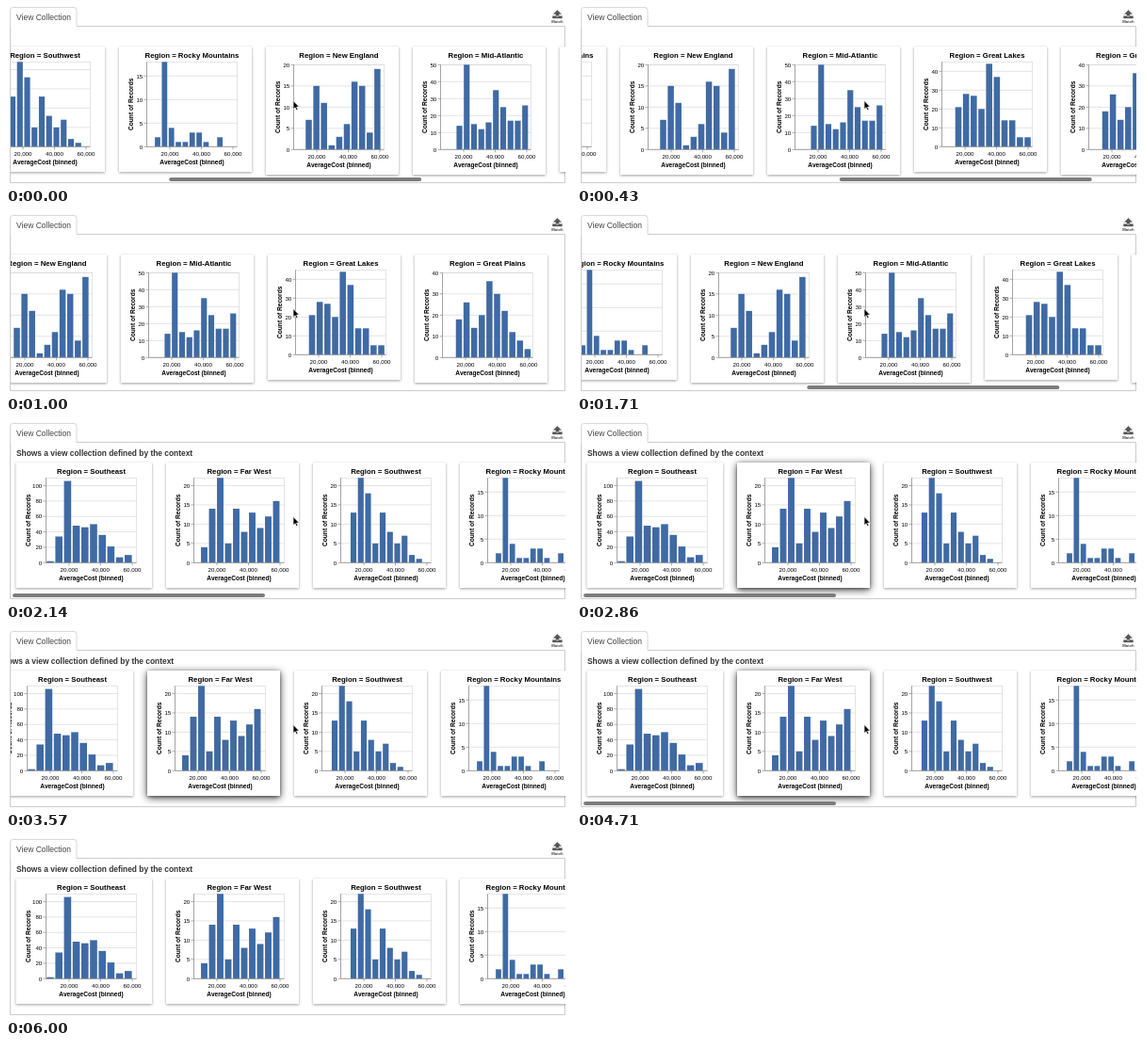
An HTML page that plays this animation: 600x191 px, repeating every 6570 ms.

```html
<!DOCTYPE html>
<html lang="en">
<head>
<meta charset="utf-8">
<title>View Collection</title>
<style>
  html, body { margin: 0; width: 100%; height: 100%; overflow: hidden; background: #fff; }
  svg { display: block; width: 600px; height: 191px; font-family: "Liberation Sans", Arial, sans-serif; }
  .card { fill: #fff; filter: drop-shadow(0 1px 1.5px rgba(0, 0, 0, .38)); }
  .lift { fill: #fff; filter: drop-shadow(0 2px 4.5px rgba(0, 0, 0, .75)); }
  .bar { fill: #3f6aa4; }
  .grid { fill: none; stroke: #d9d9d9; stroke-width: .7; }
  .axis { fill: none; stroke: #888; stroke-width: .7; }
  .title { font-weight: bold; font-size: 7.8px; text-anchor: middle; }
  .name { font-weight: bold; font-size: 6.6px; text-anchor: middle; }
  .tick { font-size: 6.2px; text-anchor: middle; }
  .end { text-anchor: end; }
</style>
</head>
<body>
<svg viewBox="0 0 600 191">
  <defs><clipPath id="panel"><rect x="5" y="22" width="589" height="165"/></clipPath></defs>
  <g fill="none" stroke="#ccc">
    <path d="M4.5 21.5V187.5H593.5V21.5H75"/>
    <path d="M4.5 21.5V4.5Q4.5 1.5 7.5 1.5H72Q75 1.5 75 4.5V21.5" stroke="#d6d6d6"/>
  </g>
  <text x="11" y="15" font-size="8.5" fill="#444">View Collection</text>
  <path d="M585.5 4.5L589.5 8.5H587V11.5H584V8.5H581.5ZM580.5 10.5V13H590.5V10.5" fill="#555" stroke="#555" stroke-width=".4"/>
  <text x="585.5" y="17.5" font-size="4.3" font-weight="bold" fill="#444" text-anchor="middle">Match</text>
  <g clip-path="url(#panel)">
    <g id="content">
      <text x="11" y="36" font-size="8.4" font-weight="bold" fill="#333">Shows a view collection defined by the context</text>
    </g>
    <rect id="thumb" y="182" width="268" height="4" rx="2" fill="#7c7c7c"/>
  </g>
  <path id="cursor" d="M0 0V9L2.1 7.2L3.5 10.3L5 9.6L3.6 6.6H6.4Z" stroke="#fff" stroke-width=".7"/>
</svg>
<script>
const LOOP = 6570, STEP = 1000 / 7;
const $ = id => document.getElementById(id);

function add(parent, tag, attrs, text = '') {
  const el = document.createElementNS('http://www.w3.org/2000/svg', tag);
  for (const key in attrs) el.setAttribute(key, attrs[key]);
  el.textContent = text;
  return parent.appendChild(el);
}

// region, y maximum, y tick step, first bar centre, bar pitch, counts
const charts = [
  ['Southeast', 110, 20, 36.5, 9.2, [2, 34, 106, 48, 46, 50, 36, 21, 7, 10]],
  ['Far West', 22, 5, 40.5, 8.5, [4, 14, 22, 5, 14, 8, 13, 9, 12, 16]],
  ['Southwest', 22, 5, 43, 7.75, [13, 22, 18, 5, 13, 8, 5, 7, 2, 1]],
  ['Rocky Mountains', 18, 5, 41, 7.35, [2, 18, 4, 1, 1, 3, 3, 1, 0, 2]],
  ['New England', 20, 5, 45.5, 8.1, [7, 15, 11, 1, 3, 6, 16, 15, 4, 19]],
  ['Mid-Atlantic', 50, 10, 49.5, 7.75, [14, 50, 15, 12, 16, 35, 25, 17, 17, 26]],
  ['Great Lakes', 45, 10, 47, 8.17, [21, 28, 27, 20, 44, 37, 14, 14, 5, 5]],
  ['Great Plains', 40, 10, 47, 8.1, [18, 26, 14, 20, 36, 30, 22, 12, 8, 4]]
];

function drawCard([region, max, step, first, pitch, counts], i) {
  const wide = i === 0;
  const drop = max % step ? 0 : 3;      // a label at the very top pushes the plot down
  const left = wide ? 32 : 29.5, base = 106.3 + drop, height = 90, width = 96;
  const y = value => base - value / max * height;
  const g = add($('content'), 'g', { transform: `translate(${wide ? 10.5 : 14 + 156 * i} 43)` });
  const box = { width: wide ? 144.5 : 141, height: 133 + drop };
  add(g, 'rect', { ...box, class: 'card' });
  const lift = add(g, 'rect', { ...box, class: 'lift', opacity: 0 });

  add(g, 'text', { x: left + width / 2, y: 12, class: 'title' }, 'Region = ' + region);
  add(g, 'rect', { x: left, y: base - height, width, height, class: 'grid' });
  for (let v = 0; v <= max; v += step) {
    add(g, 'path', { d: `M${left} ${y(v)}h${width}`, class: 'grid' });
    add(g, 'path', { d: `M${left} ${y(v)}h-3`, class: 'axis' });
    add(g, 'text', { x: left - 4.2, y: y(v) + 2.2, class: 'tick end' }, v);
  }
  counts.forEach((n, k) => add(g, 'rect', {
    x: first + k * pitch - (pitch - 1.6) / 2, y: y(n), width: pitch - 1.6, height: base - y(n), class: 'bar'
  }));
  add(g, 'path', { d: `M${left} ${base - height}V${base}h${width}`, class: 'axis' });
  [20, 40, 60].forEach((n, k) => {
    const x = left + 24.5 + 33.5 * k;
    add(g, 'path', { d: `M${x} ${base}v3`, class: 'axis' });
    add(g, 'text', { x, y: base + 9.4, class: 'tick' }, n + ',000');
  });
  add(g, 'text', { x: left + width / 2, y: base + 18.7, class: 'name' }, 'AverageCost (binned)');
  add(g, 'text', {
    transform: `translate(${wide ? 15.5 : 14.5} ${base - height / 2}) rotate(-90)`, class: 'name'
  }, 'Count of Records');
  return lift;
}

const lifts = charts.map(drawCard);

// Tracks are [step, value] pairs, joined by straight lines
const scroll = [[0, 362], [3, 592], [4, 640], [5, 664], [6, 672], [9, 672], [10, 652], [11, 592], [12, 517],
  [13, 310], [14, 110], [15, 0], [16, 35], [17, 94], [18, 60], [19, 15], [20, 0], [24, 0], [25, 20], [26, 0],
  [31, 0], [32, 9], [33, 0]];
const thumbAlpha = [[0, 1], [5, 1], [7, 0], [10, 0], [11, 1], [20, 1], [23, 0], [25, 0], [26, 1], [27, 1],
  [30, 0], [32, 0], [33, 1], [34, 1], [37, 0]];
const farWestLift = [[15, 0], [16, 1], [38, 1], [41, 0]];
const southwestLift = [[38, 0], [40, .7], [42, 0]];
const cursorX = [[38, 305], [39, 322], [40, 360], [41, 410]];
const cursorY = [[38, 100.5], [39, 116], [40, 140], [41, 168]];

function at(track, i) {
  const next = track.findIndex(key => key[0] >= i);
  if (next < 0) return track[track.length - 1][1];
  if (next === 0) return track[0][1];
  const [i0, v0] = track[next - 1], [i1, v1] = track[next];
  return v0 + (v1 - v0) * (i - i0) / (i1 - i0);
}

function draw() {
  const i = Math.floor((performance.now() % LOOP + 5) / STEP);
  const s = at(scroll, i);
  $('content').setAttribute('transform', `translate(${-s} 0)`);
  $('thumb').setAttribute('x', 7 + .459 * s);
  $('thumb').setAttribute('opacity', at(thumbAlpha, i));
  lifts[1].setAttribute('opacity', at(farWestLift, i));
  lifts[2].setAttribute('opacity', at(southwestLift, i));
  $('cursor').setAttribute('transform', `translate(${at(cursorX, i)} ${at(cursorY, i)})`);
  $('cursor').setAttribute('opacity', i < 42 ? 1 : 0);
  requestAnimationFrame(draw);
}
draw();
</script>
</body>
</html>
```
